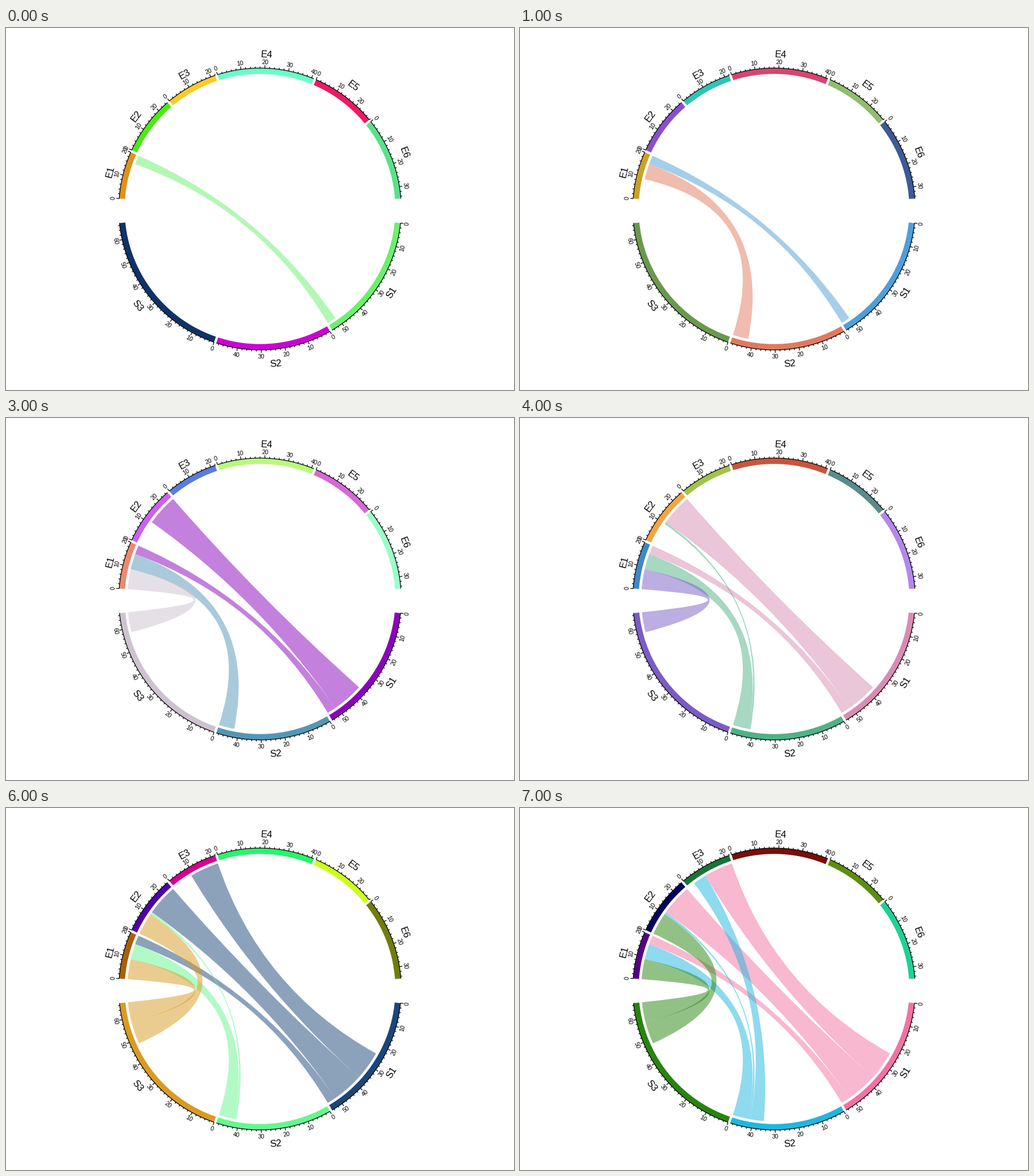
These frames come from a looping animation (885x632 px, 8000 ms). A matplotlib script:

```python
import numpy as np
import matplotlib.pyplot as plt
from matplotlib.animation import FuncAnimation
from matplotlib.patches import PathPatch, Polygon
from matplotlib.path import Path

plt.rcParams["font.family"] = "Liberation Sans"

W, H, DPI = 885, 632, 100
CX, CY = 442.5, 316
PT = 72 / DPI                      # points per pixel
R_OUT, R_IN, R_LINK = 246, 235.8, 231.2
R_TICK_TEXT, R_NAME = 257.2, 270.7
TICK_FS, NAME_FS = 10.8, 16.8      # pixels
BIG_GAP, SMALL_GAP = 10, 1

ROWS = ["S1", "S2", "S3"]
COLS = ["E1", "E2", "E3", "E4", "E5", "E6"]
FLOW = np.array([[4, 14, 13, 17, 5, 2],
                 [7, 1, 6, 8, 12, 15],
                 [9, 10, 3, 16, 11, 18]])

# One palette per step: S1 S2 S3, then E1 to E6
PALETTES = [p.split() for p in (
    "6bf06c cc00d6 0f3368 e0921b 4bea12 fbcb29 68fdc7 ee1a60 5ae18a",
    "4f9fd8 e07a5f 6a994e c9a227 8a4fd0 2ec4b6 d64570 90be6d 3d5a98",
    "eca568 dfaf2c 0a006d 1a8a6b d400d4 e600ec 317a02 a8e3fc 20e0d0",
    "8b02bc 5496b6 cdc3cf ee8870 cb60f7 597cdf b9f97e d668d8 9cfdc8",
    "d98cb3 4fb286 7a5cc7 3f88c5 f2a541 a1c349 c8553d 588b8b b388eb",
    "8877db cdab27 0b2273 df80ef 900038 95a71f 0f007b ecae57 58c90e",
    "1b4679 65f78c d99b22 ab5e09 4e00ab d90090 27f56a ceff18 707d0b",
    "f173a3 1fb7df 27850f 570086 07005f 187335 770f08 5d8e0e 1fd193",
)]

names = ROWS + COLS
sizes = dict(zip(names, [*FLOW.sum(axis=1), *FLOW.sum(axis=0)]))
small_gaps = SMALL_GAP * (len(names) - 2)
SCALE = (360 - 2 * BIG_GAP - small_gaps) / sum(sizes.values())


def sector_starts():
    """Start angle of each sector, clockwise, with both big gaps level."""
    lower = FLOW.sum() * SCALE + SMALL_GAP * (len(ROWS) - 1)
    angle = -(180 - lower) / 2
    starts = {}
    for name in names:
        starts[name] = angle
        gap = BIG_GAP if name == ROWS[-1] else SMALL_GAP
        angle -= sizes[name] * SCALE + gap
    return starts


starts = sector_starts()


def angle_at(name, value):
    return starts[name] - value * SCALE


def polar(angle, radius):
    a = np.radians(angle)
    return np.column_stack([CX + radius * np.cos(a), CY + radius * np.sin(a)])


def arc(name, lo, hi, radius):
    n = int(8 + 3 * abs(hi - lo))
    return polar(np.linspace(angle_at(name, lo), angle_at(name, hi), n), radius)


def text_on_ring(angle, radius, label, size):
    """Tangential text, centred on its cap height and turned to stay readable."""
    up = np.sin(np.radians(angle)) > 0
    shift = -0.36 * size if up else 0.36 * size
    x, y = polar(np.array([angle]), radius + shift)[0]
    ax.text(x, y, label, fontsize=size * PT, ha="center", va="baseline",
            rotation=angle - 90 if up else angle + 90, rotation_mode="anchor")


def black_line(points):
    ax.plot(*points.T, color="black", lw=1.25 * PT, solid_capstyle="butt",
            zorder=3)


def draw_axis(name):
    black_line(arc(name, 0, sizes[name], R_OUT))
    for value in range(0, sizes[name] + 1, 2):
        major = value % 10 == 0
        a = angle_at(name, value)
        black_line(polar(np.array([a, a]),
                         np.array([R_OUT, R_OUT + (5 if major else 2.7)])))
        if major:
            text_on_ring(a, R_TICK_TEXT, str(value), TICK_FS)
    text_on_ring(angle_at(name, sizes[name] / 2), R_NAME, name, NAME_FS)


def link_path(i, j):
    """Ribbon between row i and column j; its sides bend towards the centre."""
    row_lo = FLOW[i, j + 1:].sum()
    col_lo = FLOW[i + 1:, j].sum()
    a = arc(ROWS[i], row_lo, row_lo + FLOW[i, j], R_LINK)
    b = arc(COLS[j], col_lo, col_lo + FLOW[i, j], R_LINK)
    centre = [[CX, CY]]
    verts = np.concatenate([a, centre, b, centre, a[:1]])
    bend = [Path.CURVE3] * 2
    codes = ([Path.MOVETO] + [Path.LINETO] * (len(a) - 1) + bend
             + [Path.LINETO] * (len(b) - 1) + bend)
    return Path(verts, codes)


fig = plt.figure(figsize=(W / DPI, H / DPI), dpi=DPI, facecolor="white")
ax = fig.add_axes([0, 0, 1, 1])
ax.set_xlim(0, W)
ax.set_ylim(0, H)
ax.axis("off")

bands = []
for name in names:
    edge = np.concatenate([arc(name, 0, sizes[name], R_OUT),
                           arc(name, sizes[name], 0, R_IN)])
    bands.append(ax.add_patch(Polygon(edge, lw=0, zorder=2)))
    draw_axis(name)

links = []
for k in range(len(PALETTES)):
    j, i = divmod(k, len(ROWS))
    links.append((i, ax.add_patch(PathPatch(link_path(i, j), lw=0, zorder=1))))


def draw(step):
    colors = ["#" + c for c in PALETTES[step]]
    for band, color in zip(bands, colors):
        band.set_facecolor(color)
    for k, (i, link) in enumerate(links):
        link.set_facecolor((colors[i], 0.5))
        link.set_visible(k <= step)
    return bands + [link for _, link in links]


anim = FuncAnimation(fig, draw, frames=len(PALETTES), interval=1000,
                     init_func=lambda: draw(0), repeat=True, repeat_delay=0)
plt.show()
```
